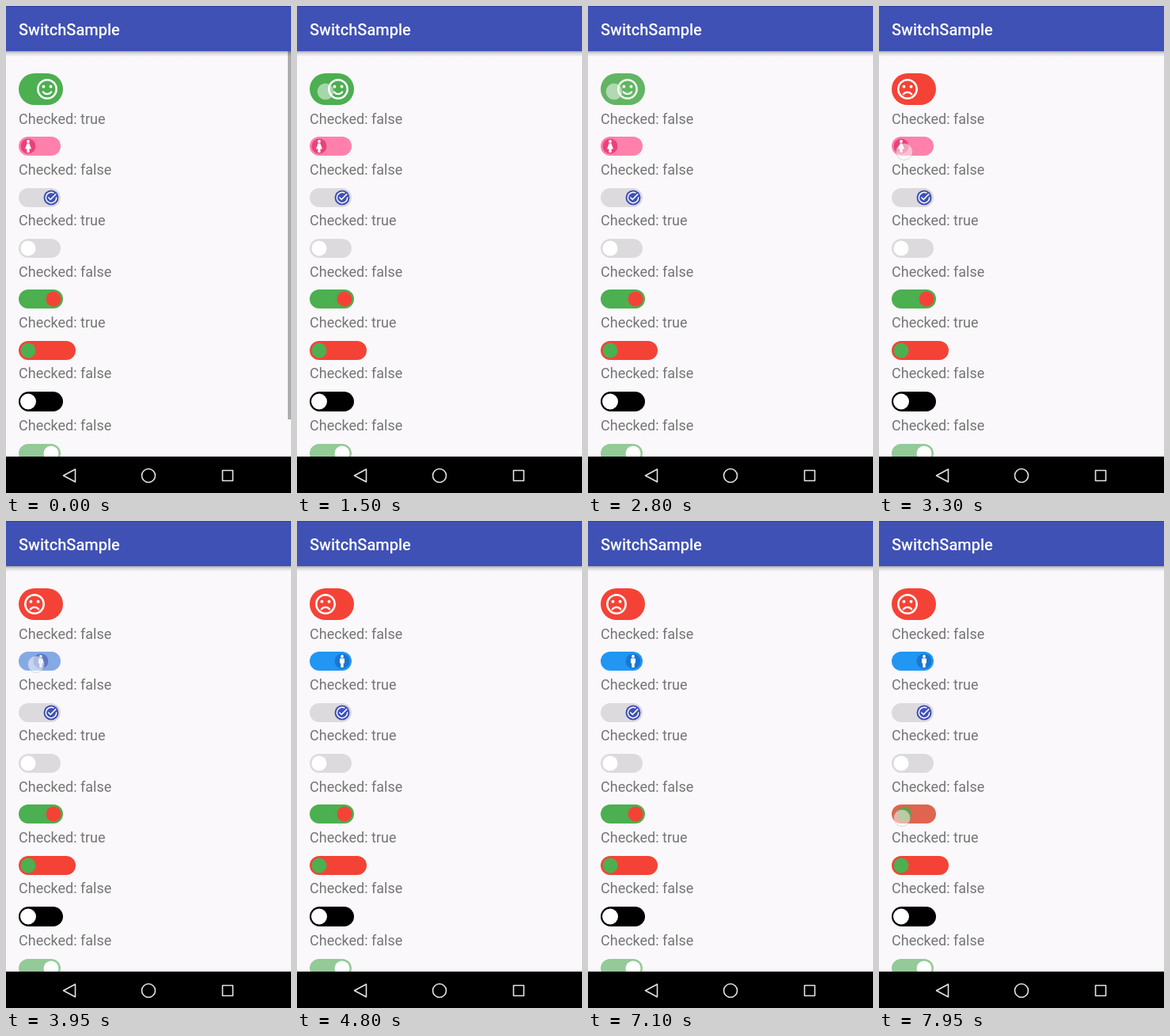
Write an HTML page that moves like this. It is 360 px wide and 615 px high and loops after 8 s.

```html
<!DOCTYPE html>
<html lang="en">
<head>
<meta charset="utf-8">
<title>SwitchSample</title>
<style>
  html, body { margin: 0; width: 100%; height: 100%; overflow: hidden; background: #faf8fb; }
  svg { display: block; width: 100%; height: 100%; }
  text { font-family: Roboto, sans-serif; font-size: 18px; fill: #757575; }
  .title { font-size: 20px; font-weight: 500; fill: #fff; }
  .line { fill: none; stroke: #fff; }
  .nav { fill: none; stroke: #e4e4e4; stroke-width: 1.6; stroke-linejoin: round; }
</style>
</head>
<body>
<svg viewBox="0 0 360 615">
  <defs>
    <linearGradient id="shade" x2="0" y2="1">
      <stop stop-color="#000" stop-opacity=".32"/>
      <stop offset=".4" stop-color="#000" stop-opacity=".12"/>
      <stop offset="1" stop-color="#000" stop-opacity="0"/>
    </linearGradient>
  </defs>
  <rect width="360" height="615" fill="#faf8fb"/>
  <g id="list"></g>
  <rect id="scrollbar" x="356" y="57" width="4" height="465" fill="#acabae"/>
  <rect y="57" width="360" height="7" fill="url(#shade)"/>
  <rect width="360" height="57" fill="#3f51b5"/>
  <rect width="360" height="1" fill="#303f9f"/>
  <text class="title" x="16" y="37">SwitchSample</text>
  <rect y="569" width="360" height="46" fill="#000"/>
  <g class="nav">
    <path d="M72.5 593 87.5 585V601Z"/>
    <circle cx="180" cy="593" r="8.5"/>
    <rect x="273.5" y="586.5" width="13" height="13"/>
  </g>
  <circle id="touch" r="10.5" fill="#fff" fill-opacity=".5" stroke="#888" stroke-opacity=".3"/>
</svg>
<script>
const LOOP = 8000, FRAME = 50;
const GREEN = '#4caf50', RED = '#f44336', GREY = '#dcdadd', WHITE = '#fff';

const disc = (color, r = 9.5) => `<circle r="${r}" fill="${color}"/>`;

const face = mouth => `<g transform="scale(1.3)" class="line">
  <circle r="9" stroke-width="1.9"/>
  <g fill="#fff" stroke="none"><circle cx="-3.5" cy="-2.5" r="1.5"/><circle cx="3.5" cy="-2.5" r="1.5"/></g>
  <path d="${mouth}" stroke-width="1.6"/></g>`;
const happy = face('M-4.4 2.2A5 5 0 0 0 4.4 2.2');
const sad = face('M-4.4 5.6A5 5 0 0 1 4.4 5.6');

const person = (color, body) => disc(color) +
  `<g fill="#fff"><circle cy="-6" r="1.9"/><path d="${body}"/></g>`;
const woman = person('#ec407a', 'M-1.4-3.5H1.4L4 3.5H1.6V8H-1.6V3.5H-4Z');
const man = person('#1976d2', 'M-2-3.5H2Q3-3.5 3-2.5V2.5H1.7V8H-1.7V2.5H-3V-2.5Q-3-3.5-2-3.5Z');

const check = disc('#3f51b5') + `<g class="line" stroke-width="1.5">
  <path d="M3.4-5.8A6.7 6.7 0 1 0 6.7-.6"/><path d="M-3.6-.5-.8 2.4 6.2-4.6"/></g>`;

// off / on: [track colour, thumb]; without "on" the same look only slides
const rows = [
  { y: 85, h: 40, w: 56, base: 149, checked: true, left: 36, right: 52, off: [RED, sad], on: [GREEN, happy] },
  { y: 165, w: 53, base: 213, off: ['#ff80ab', woman], on: ['#2196f3', man] },
  { y: 230, w: 53, base: 277, checked: true, off: [GREY, check] },
  { y: 294, w: 53, base: 342, off: [GREY, disc(WHITE)] },
  { y: 358, w: 56, base: 406, checked: true, off: [RED, disc(GREEN)], on: [GREEN, disc(RED)] },
  { y: 423, w: 72, base: 470, off: [RED, disc(GREEN)] },
  { y: 487, h: 25, w: 56, base: 536, off: ['#000', disc(WHITE, 10)] },
  { y: 553, w: 53, base: 600, checked: true, off: ['#94ca97', disc(WHITE)] }
];

// start, row, steps, touch x, touch y
const taps = [
  [1500, 0, 5, 36, 108], [2100, 0, 6, 32, 111], [2750, 0, 6, 33, 108],
  [3300, 1, 6, 32, 184], [3850, 1, 6, 38, 181], [4600, 1, 5, 34, 180],
  [5250, 2, 5, 23, 242], [5750, 2, 6, 28, 244], [6300, 3, 6, 28, 308],
  [6900, 3, 5, 32, 308], [7400, 4, 6, 30, 365], [7900, 4, 6, 29, 375]
];
const progress = { 5: [0, .3, .72, .95, 1], 6: [0, .13, .45, .8, .97, 1] };

const byId = id => document.getElementById(id);
const list = byId('list'), touch = byId('touch'), scrollbar = byId('scrollbar');

for (const row of rows) {
  const { y, w, h = 24, base } = row;
  row.left ??= 28;
  row.right ??= w + 4;
  const states = row.on ? [row.off, row.on] : [row.off];
  const group = document.createElementNS('http://www.w3.org/2000/svg', 'g');
  group.innerHTML =
    states.map(s => `<rect class="layer" x="16" y="${y}" width="${w}" height="${h}" rx="${h / 2}" fill="${s[0]}"/>`).join('') +
    `<g class="thumb">${states.map(s => `<g class="layer">${s[1]}</g>`).join('')}</g>` +
    `<text x="16" y="${base}"></text>`;
  list.append(group);
  row.layers = group.querySelectorAll('.layer');
  row.thumb = group.querySelector('.thumb');
  row.label = group.querySelector('text');
  row.middle = y + h / 2;
}

function show(row, amount, checked) {
  const x = row.left + (row.right - row.left) * amount;
  row.thumb.setAttribute('transform', `translate(${x} ${row.middle})`);
  if (row.on) row.layers.forEach((layer, i) => layer.setAttribute('opacity', i % 2 ? amount : 1 - amount));
  const text = `Checked: ${checked}`;
  if (row.label.textContent !== text) row.label.textContent = text;
}

function draw(time) {
  const t = Math.floor((time % LOOP) / FRAME) * FRAME;
  const state = rows.map(({ checked = false }) => ({ checked, amount: +checked }));
  let finger = null;
  for (const [start, index, steps, x, y] of taps) {
    if (t < start) break;
    const step = (t - start) / FRAME, lead = steps - 5, s = state[index];
    const p = progress[steps][Math.min(step, steps - 1)];
    s.amount = s.checked ? 1 - p : p;
    if (step >= lead) s.checked = !s.checked;
    if (step < lead + 2) finger = [x, y];
  }
  rows.forEach((row, i) => show(row, state[i].amount, state[i].checked));
  touch.setAttribute('visibility', finger ? 'visible' : 'hidden');
  if (finger) touch.setAttribute('transform', `translate(${finger})`);
  scrollbar.setAttribute('opacity', Math.max(0, Math.min(1, (1100 - t) / 300)));
}

const began = performance.now();
function tick() {
  draw(performance.now() - began);
  requestAnimationFrame(tick);
}
tick();
</script>
</body>
</html>
```
